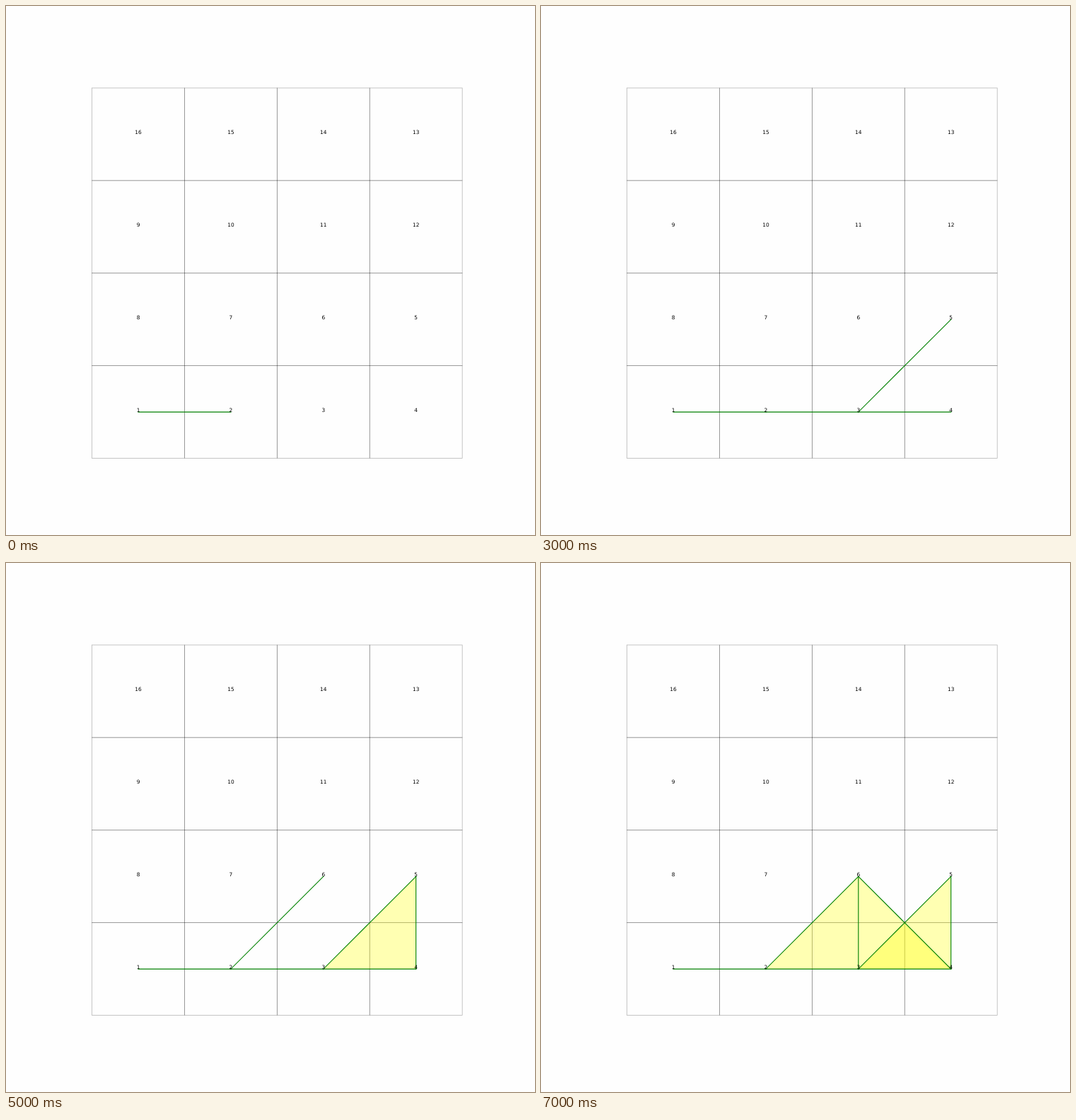
Recreate the animation shown at these times as an HTML page. Size 748 by 748 pixels, loop 8000 ms.

```html
<!DOCTYPE html>
<html lang="en">
<head>
<meta charset="utf-8">
<title>Edges and triangles on a grid</title>
<style>
  html, body { margin: 0; width: 100%; height: 100%; overflow: hidden; background: #fefefe; }
  svg { display: block; width: 748px; height: 748px; }
  rect { fill: none; stroke: #000; stroke-opacity: .3; stroke-width: .742; }
  polygon { fill: #ff0; fill-opacity: .3; }
  line { stroke: #008000; stroke-width: 1.11; stroke-linecap: square; }
  text { font: 7.42px "DejaVu Sans", sans-serif; text-anchor: middle; }
</style>
</head>
<body>
<svg id="stage" viewBox="0 0 748 748"></svg>
<script>
const CELL = 130.9, LEFT = 121.55, BOTTOM = 639.54, STEP_MS = 1000;

// Each step adds an edge, and a triangle when a third node is given.
const steps = [[1, 2], [2, 3], [3, 4], [3, 5], [4, 5, 3], [2, 6], [3, 6, 2], [4, 6, 3]];

// Nodes run in a snake from the bottom left; this gives the cell centre.
function center(node) {
  const row = Math.floor((node - 1) / 4), k = (node - 1) % 4;
  const col = row % 2 ? 3 - k : k;
  return [LEFT + (col + .5) * CELL, BOTTOM - (row + .5) * CELL];
}

const nodes = Array.from({ length: 16 }, (_, i) => i + 1);

const cells = nodes.map(n => {
  const [x, y] = center(n);
  return `<rect x="${x - CELL / 2}" y="${y - CELL / 2}" width="${CELL}" height="${CELL}"/>`;
});

const labels = nodes.map(n => {
  const [x, y] = center(n);
  return `<text x="${x}" y="${y}">${n}</text>`;
});

const triangles = steps.map((step, i) => step.length < 3 ? "" :
  `<polygon data-step="${i}" points="${step.map(center).join(" ")}"/>`);

const edges = steps.map(([a, b], i) => {
  const [x1, y1] = center(a), [x2, y2] = center(b);
  return `<line data-step="${i}" x1="${x1}" y1="${y1}" x2="${x2}" y2="${y2}"/>`;
});

const stage = document.getElementById("stage");
stage.innerHTML = [cells, triangles, edges, labels].flat().join("");
const parts = stage.querySelectorAll("[data-step]");

const start = performance.now();
function draw() {
  const current = Math.floor((performance.now() - start) / STEP_MS) % steps.length;
  for (const part of parts) {
    part.style.display = part.dataset.step <= current ? "" : "none";
  }
  requestAnimationFrame(draw);
}
draw();
</script>
</body>
</html>
```
